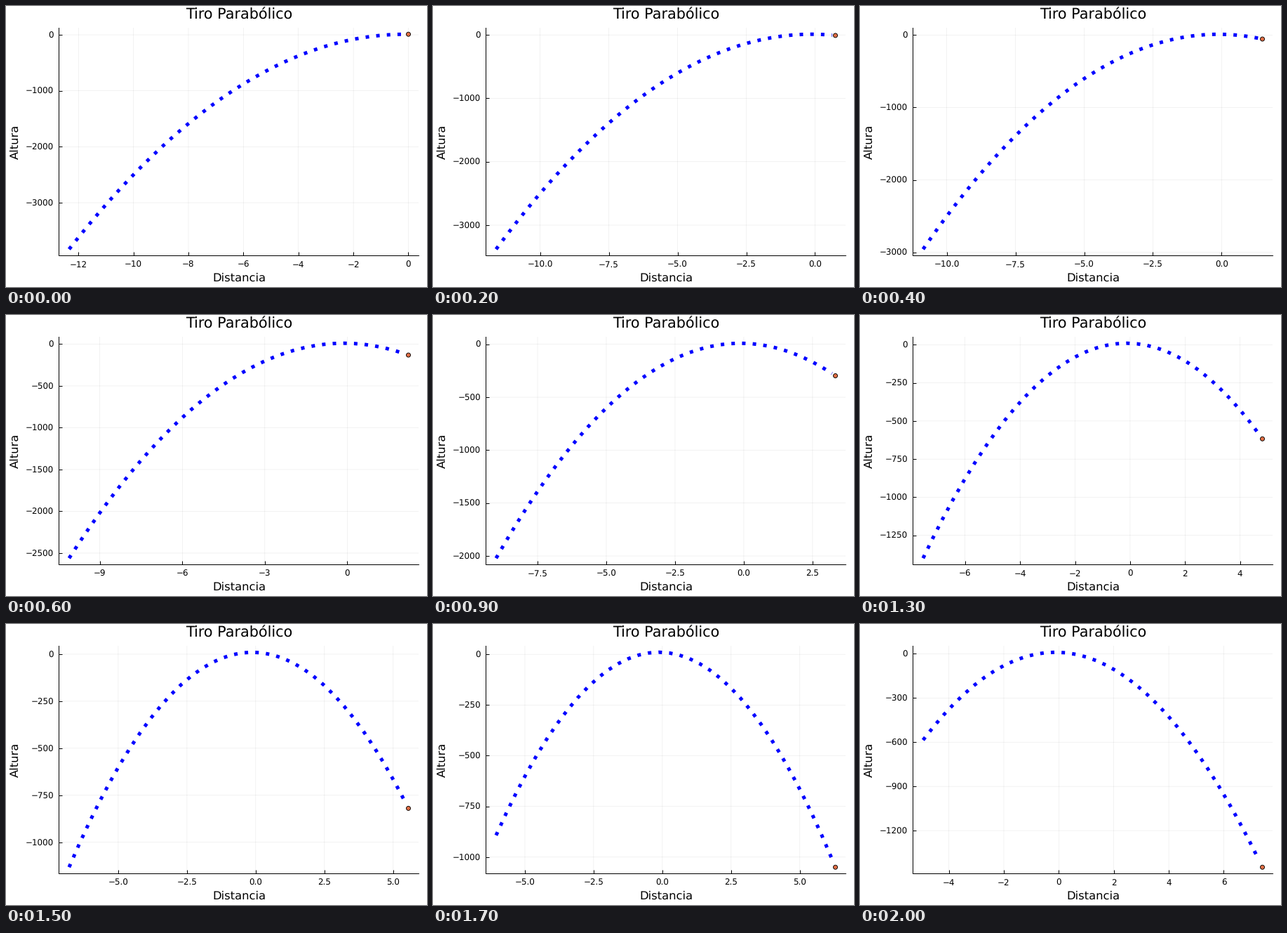
Recreate the animation shown at these times as a matplotlib script. Size 600 by 400 pixels, loop 2.1 s.

```python
import math

import matplotlib.pyplot as plt
import numpy as np
from matplotlib.animation import FuncAnimation
from matplotlib.patches import Circle
from matplotlib.transforms import IdentityTransform

W, H, DPI = 600, 400, 100
PX = 72 / DPI
LEFT, RIGHT, TOP, BOTTOM = 75.4, 588, 31, 355.4

SPEED, ANGLE, HEIGHT, G = 4, 30, 10, 9.8  # the angle is taken as radians
DT, TRAIL, FRAMES = 0.6, 20, 21
STEP_SCORES = {1: 1.0, 5: 0.9, 2: 0.7, 2.5: 0.5, 3: 0.2}

plt.rcParams.update({"font.family": "DejaVu Sans", "path.simplify": False,
                     "text.hinting": "none"})


def position(t):
    x = SPEED * math.cos(ANGLE) * t
    y = HEIGHT + SPEED * math.sin(ANGLE) * t - G * t**2
    return x, y


def padded(values):
    lo, hi = min(values), max(values)
    pad = 0.03 * (hi - lo)
    return lo - pad, hi + pad


def nice_ticks(lo, hi):
    """Weigh tick count, coverage and roundness; ties go to the wider step."""
    span = hi - lo
    order = math.floor(math.log10(span))
    best = None
    for z in (order - 1, order):
        for q, nice in STEP_SCORES.items():
            step = q * 10.0**z
            ticks = np.arange(math.ceil(lo / step), math.floor(hi / step) + 1) * step
            n = len(ticks)
            if not 4 <= n <= 9:
                continue
            count = 1 - abs(n - 5) / 5
            cover = 1.5 * span / ((n - 1) * step)
            score = round(count / 4 + cover / 3 + nice / 4, 9)
            if best is None or (score, step) > best[:2]:
                best = score, step, ticks
    return best[2]


def tick_labels(ticks):
    digits = 0 if np.allclose(ticks, np.round(ticks)) else 1
    return [f"{v:.{digits}f}".replace("-", "\u2212") for v in ticks]


def label(x, y, text, size, **kw):
    fig.text(x / W, 1 - y / H, text, fontsize=size * PX, ha="center",
             va="baseline", **kw)


fig = plt.figure(figsize=(W / DPI, H / DPI), dpi=DPI, facecolor="white")
ax = fig.add_axes([LEFT / W, 1 - BOTTOM / H, (RIGHT - LEFT) / W, (BOTTOM - TOP) / H])
ax.spines[["top", "right"]].set_visible(False)
for side in ("left", "bottom"):
    ax.spines[side].set_linewidth(PX)
ax.set_axisbelow(True)
ax.grid(color="black", alpha=0.1, linewidth=0.5 * PX)
ax.tick_params(direction="in", length=5 * PX, width=PX, labelsize=11.9 * PX, pad=7.5 * PX)

label(332, 18.6, "Tiro Parab\u00f3lico", 20.75)
label(332, 392, "Distancia", 16.4)
label(17.3, 193, "Altura", 16.4, rotation=90, rotation_mode="anchor")

path, = ax.plot([], [], color="blue", linewidth=5 * PX,
                linestyle=(0, (1, 2.038)), dash_capstyle="butt")
# Placed in pixels, so its centre is not rounded to the pixel grid.
ball = Circle((0, 0), 3, facecolor="#e26f46", edgecolor="black", linewidth=0.9 * PX,
              transform=IdentityTransform(), zorder=5)
ax.add_artist(ball)


def update(i):
    now = i * DT
    xs, ys = position(now - TRAIL + DT * np.arange(int(TRAIL / DT) + 1))
    x, y = position(now)
    path.set_data(xs, ys)

    xlim, ylim = padded([*xs, x]), padded([*ys, y])
    xticks, yticks = nice_ticks(*xlim), nice_ticks(*ylim)
    ax.set_xticks(xticks, tick_labels(xticks))
    ax.set_yticks(yticks, tick_labels(yticks))
    ax.set_xlim(xlim)
    ax.set_ylim(ylim)
    for line in (*ax.get_xgridlines(), *ax.get_ygridlines()):
        line.set_snap(False)
    ball.set_center(ax.transData.transform((x, y)))
    return path, ball


anim = FuncAnimation(fig, update, frames=FRAMES, init_func=lambda: update(0),
                     interval=100, repeat=True, repeat_delay=0, blit=False)
plt.show()
```
